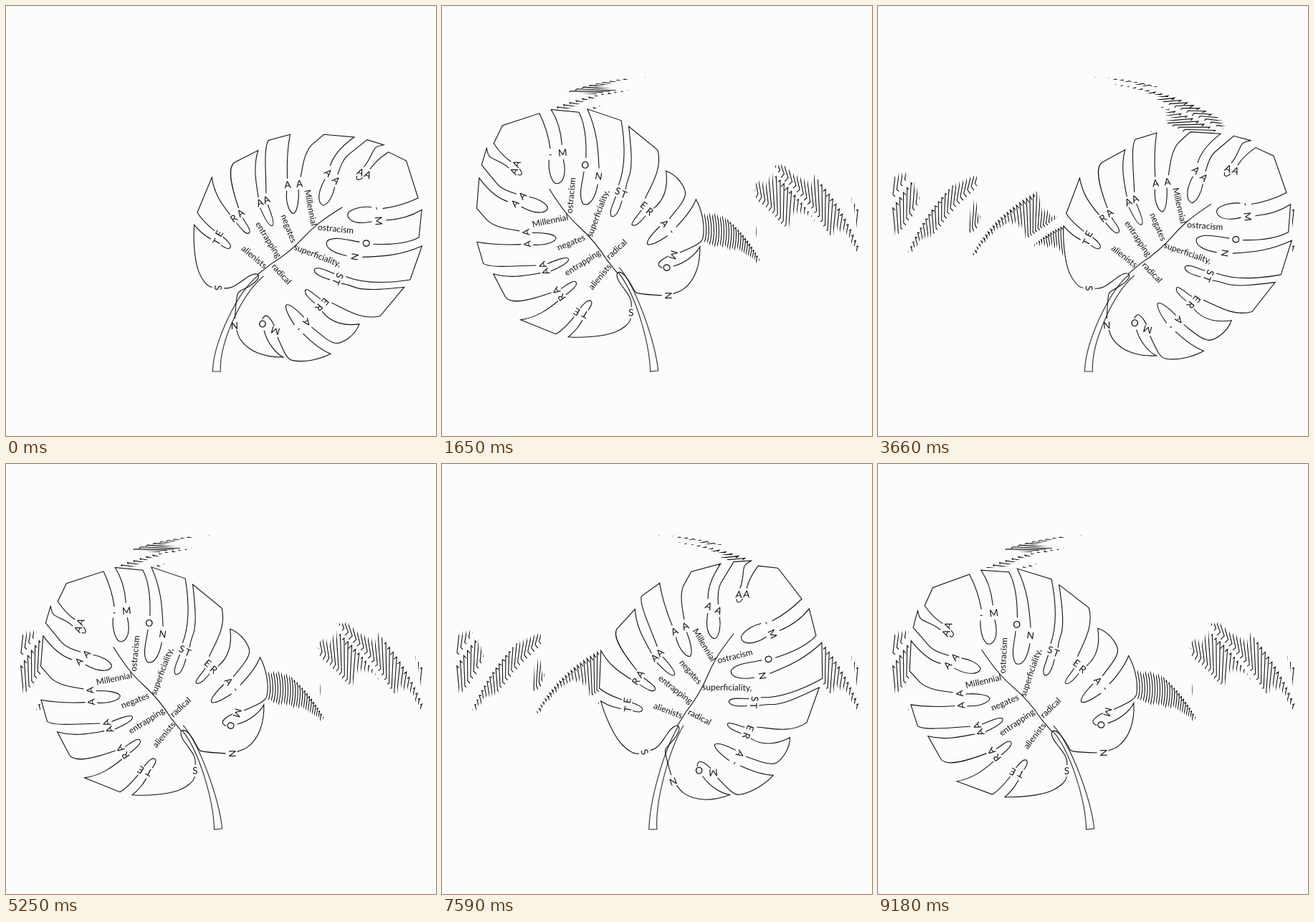
Animation of 600x600 px, one loop 9210 ms. Source, as an HTML page with a canvas:

```html
<!DOCTYPE html>
<html lang="en">
<head>
<meta charset="utf-8">
<title>Swaying monstera</title>
<style>
  html, body { margin: 0; width: 100%; height: 100%; overflow: hidden; background: #fcfcfc; }
  canvas { display: block; width: 600px; height: 600px; }
</style>
</head>
<body>
<canvas id="stage" width="600" height="600"></canvas>
<script>
const ctx = document.getElementById('stage').getContext('2d');
const PAPER = '#fcfcfc', INK = '#111', STEM_INK = '#3a3a3a';
const LOOP = 9210, STEP = 30, HALF_SWING = 60;

// The blade is drawn upright and turns as a rigid piece around its base.
const PIVOT = { x: 291, y: 360 };

const leftEdges = [
  'M325 167C334 152 341 132 344 119L293 100L268 112C267 124 268 138 271 147',
  'M263 152C261 138 252 128 252 122C252 117 255 114 256 111L236 125L236.5 160C237 168 244 180 249 187',
  'M233 188C226 178 221 162 222 137L193 168L194 190C196 204 208 217 220 230',
  'M210 246C195 235 177 220 164 205L152 234C156 246 185 264 208 282',
  'M206 294C188 284 168 274 154 254L147 290C146 304 175 316 201 325',
  'M201 340C183 340 165 340 144 328L170 374C182 376 195 373 205 371',
  'M211 382C203 385 195 388 181 388C196 402 220 418 235 423C247 427 260 427 265 422'
];
const rightEdges = [
  'M341 173C350 160 358 145 360 125L388 152C384 173 368 194 356 208',
  'M361 231C377 209 391 190 400 156L427 198C412 225 392 252 368 266',
  'M372 277C378 270 388 266 392 262C404 252 416 233 430 211L441 262C430 287 402 295 385 304',
  'M386 322C404 322 420 312 432 292C441 306 439 327 433 334C425 342 405 344 394 347',
  'M394 362C410 360 428 356 440 349C437 366 427 386 414 397C408 402 395 398 376 393',
  'M357 402C370 408 390 410 403 404C388 424 368 437 348 436C343 436 338 434 333 432'
];
const leftSlits = [
  'M267 167C269 171 274 172 274 162',
  'M260 201C268 210 273 222 271 229C267 234 253 230 243 205',
  'M232 243C243 251 255 263 254 269C251 273 236 270 223 257',
  'M222 290C236 294 250 299 249 303C247 308 230 304 219 301',
  'M215 329C225 330 237 330 237 335C237 340 225 340 215 340',
  'M219 367C227 365 237 364 237 369C237 373 230 375 226 376'
];
const rightSlits = [
  'M314 178C306 186 299 199 300 208C303 216 318 215 330 190',
  'M342 221C333 230 313 243 313 256C317 264 330 261 346 247',
  'M355 276C346 282 333 287 333 294C337 300 350 292 358 286',
  'M371 313C364 316 349 317 348 321C349 327 362 325 371 323',
  'M377 347C366 348 349 350 348 356C351 361 365 363 377 364',
  'M361 387C354 385 342 384 342 389C342 392 343 394 344 394'
];
const vein = 'M289 210C285 245 286 262 289 280S292 320 290 338L290 361';
const base = 'M276 410C284 402 283 394 284 380C284 368 287 361 291 361' +
  'C295 361 297 368 296 378C295 390 291 397 295 401C301 408 310 416 319 424';

// text, centre x, centre y, angle in degrees
const letters = [
  ['A', 275, 154, -28], ['A', 266, 160, -28],
  ['A', 254, 194, -8], ['A', 239, 196, -8],
  ['A', 226, 237, -57], ['A', 217, 251, -57],
  ['A', 215.5, 287, -74], ['A', 213, 297, -74],
  ['A', 208, 327, -88], ['R', 208, 339, -88],
  ['E', 212, 368, -112], ['T', 219, 378, -112],
  ['S', 270.5, 416, 40],
  ['-', 320, 173, 33], ['M', 335, 182, 33],
  ['O', 349, 215, 40], ['N', 354, 239, 48],
  ['S', 362, 272, 60], ['T', 365.5, 281, 60],
  ['E', 378, 310, 78], ['R', 379, 322, 78],
  ['A', 385, 348, 92], ['-', 386, 363, 92],
  ['M', 367, 390, 145], ['O', 348.5, 398, 145],
  ['N', 326, 430, 128]
];
const words = [
  ['Millennial', 262, 246, 27], ['negates', 266, 288, 17],
  ['entrapping', 261, 320, 6], ['alienists', 268, 350.5, -12],
  ['ostracism', 307.5, 236.5, -46], ['superficiality,', 321, 279.5, -31],
  ['radical', 310, 335, -4]
];

const edges = leftEdges.concat(rightEdges);
const blade = new Path2D(edges.concat(leftSlits, rightSlits, vein, base).join(''));
const rim = edges.flatMap(samplePath);

function samplePath(d) {
  const path = document.createElementNS('http://www.w3.org/2000/svg', 'path');
  path.setAttribute('d', d);
  const length = path.getTotalLength(), count = Math.ceil(length / 2);
  return Array.from({ length: count + 1 }, (_, i) => path.getPointAtLength(length * i / count));
}

// Sway runs evenly from 1 (right) to -1 (left) and back.
function poseAt(frame) {
  const p = frame % (2 * HALF_SWING);
  const sway = Math.abs(p - HALF_SWING) / (HALF_SWING / 2) - 1;
  const angle = 50.3 * (sway + 1 / 30) * Math.PI / 180;
  const cos = Math.cos(angle), sin = Math.sin(angle);
  const x = 293.1 + 124 * Math.sin(sway / 2);
  const y = 360 - 1.3 * sway + 16 * sway * sway;
  const place = pt => {
    const dx = pt.x - PIVOT.x, dy = pt.y - PIVOT.y;
    return { x: x + dx * cos - dy * sin, y: y + dx * sin + dy * cos };
  };
  return { sway, angle, x, y, place };
}

// Only the leaf's bounding box is repainted, so slivers of older poses stay outside it.
function clearBox(pose) {
  let left = 600, right = 0, top = 600;
  for (const pt of rim) {
    const q = pose.place(pt);
    left = Math.min(left, q.x);
    right = Math.max(right, q.x);
    top = Math.min(top, q.y);
  }
  left = Math.floor(left - 0.5);
  top = Math.floor(top - 0.5);
  ctx.fillStyle = PAPER;
  ctx.fillRect(left, top, Math.ceil(right + 0.5) - left, 512 - top);
}

function drawStem(pose) {
  const { sway, place } = pose;
  const foot = 289.6 - 1.3 * sway;
  const topL = place({ x: 291.5, y: 361 }), bendL = place({ x: 292, y: 400 });
  const topR = place({ x: 297, y: 356 }), bendR = place({ x: 298, y: 396 });
  ctx.strokeStyle = STEM_INK;
  ctx.lineWidth = 1.2;
  ctx.beginPath();
  ctx.moveTo(topL.x, topL.y);
  ctx.bezierCurveTo(bendL.x, bendL.y, 289.5, 470, foot, 510);
  ctx.lineTo(foot + 11, 509.3 + 0.7 * sway);
  ctx.bezierCurveTo(297.5, 470, bendR.x, bendR.y, topR.x, topR.y);
  ctx.stroke();
}

function drawTexts(list, size, drop) {
  ctx.font = size + 'px Lato, sans-serif';
  for (const [text, x, y, deg] of list) {
    ctx.save();
    ctx.translate(x, y);
    ctx.rotate(deg * Math.PI / 180);
    ctx.fillText(text, 0, drop);
    ctx.restore();
  }
}

function drawFrame(frame) {
  const pose = poseAt(frame);
  clearBox(pose);
  drawStem(pose);
  ctx.save();
  ctx.translate(pose.x, pose.y);
  ctx.rotate(pose.angle);
  ctx.translate(-PIVOT.x, -PIVOT.y);
  ctx.strokeStyle = ctx.fillStyle = INK;
  ctx.lineWidth = 1.1;
  ctx.textAlign = 'center';
  ctx.stroke(blade);
  drawTexts(letters, 13.5, 4.8);
  drawTexts(words, 12, 3.4);
  ctx.restore();
}

let last = -1;

function tick() {
  const t = performance.now() % LOOP;
  const frame = Math.max(0, Math.floor(t / STEP) - 1);
  if (frame < last) last = -1;
  if (last < 0) {
    ctx.fillStyle = PAPER;
    ctx.fillRect(0, 0, 600, 600);
  }
  // Replay every step in between, so the trails depend on the time alone.
  while (last < frame) drawFrame(++last);
  requestAnimationFrame(tick);
}
tick();
</script>
</body>
</html>
```
